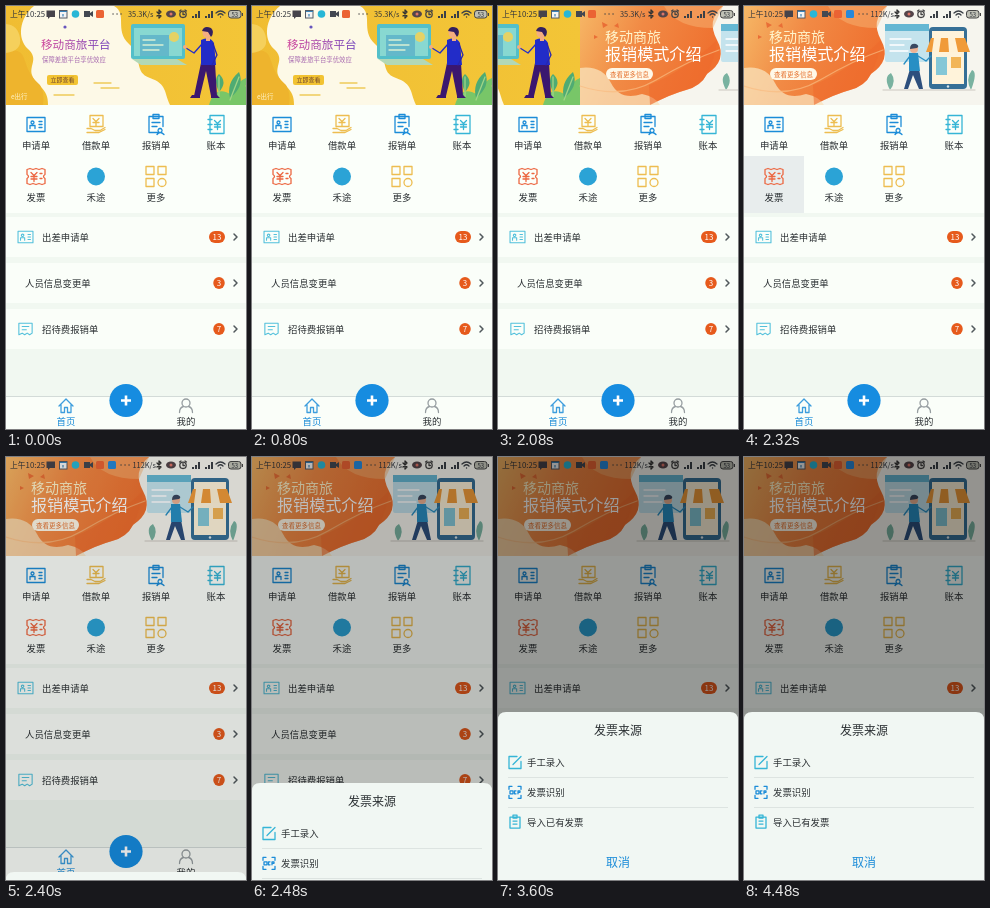
These frames come from a looping animation (240 px wide and 423 px high, 4.72 s). An HTML page:

```html
<!DOCTYPE html>
<html lang="zh-CN">
<head>
<meta charset="utf-8">
<style>
html, body { margin: 0; width: 100%; height: 100%; overflow: hidden; background: #fbfffa; }
svg { display: block; width: 100vw; height: 100vh; }
text { font-family: "Noto Sans CJK SC", "Noto Sans CJK", "Noto Sans", sans-serif; font-size: 9.4px; font-weight: 500; fill: #2b3033; }
.mid { text-anchor: middle; }
.line { fill: none; stroke-width: 1.3; stroke-linecap: round; stroke-linejoin: round; }
.blue { stroke: #1b8cd8; }
.gold { stroke: #edbd50; }
.cyan { stroke: #35b5d6; }
.red { stroke: #ec6741; }
.status text { font-size: 7.8px; fill: #30343b; }
</style>
</head>
<body>
<svg viewBox="0 0 240 423">
  <defs>
    <linearGradient id="gold" x2="1"><stop stop-color="#f0bd32"/><stop offset="1" stop-color="#f3c537"/></linearGradient>
    <linearGradient id="ink" x2="1"><stop stop-color="#d0459c"/><stop offset="1" stop-color="#7447bd"/></linearGradient>
    <linearGradient id="orange" x2="1" y2=".3"><stop stop-color="#f6b866"/><stop offset=".45" stop-color="#f18a45"/><stop offset="1" stop-color="#ef702f"/></linearGradient>
    <clipPath id="frame"><rect width="240" height="99"/></clipPath>
  </defs>
  <rect width="240" height="423" fill="#fbfffa"/>

  <g clip-path="url(#frame)">
    <g id="bannerA">
      <rect width="240" height="99" fill="url(#gold)"/>
      <path d="M28 0H108C122 8 108 24 123 38S127 66 144 72 158 86 164 99H42C43 82 29 79 26 69S33 53 22 43 13 12 28 0Z" fill="#fdf9e7"/>
      <path d="M0 46Q15 40 19 55T34 79Q39 87 37 99H0Z" fill="#eeb42d"/>
      <path d="M0 18Q12 19 14 32T0 47Z" fill="#f6d466" opacity=".8"/>
      <circle cx="59" cy="21" r="1.600" fill="#6755bd"/>
      <path class="line" d="M88 77h17M95 82h18M48 89h20" stroke="#efcb5a"/>
      <text x="35" y="43" font-weight="700" style="font-size:11.6px;fill:url(#ink)">移动商旅平台</text>
      <text x="36" y="56" style="font-size:6.400px;fill:#a86bb0">保障差旅平台享优效应</text>
      <rect x="41" y="69" width="31" height="10" rx="2" fill="#f2c332"/>
      <text class="mid" x="56.500" y="76.300" style="font-size:6px;fill:#70452f">立即查看</text>
      <text x="5" y="93" style="font-size:6.500px;fill:#fff5ce">e出行</text>
      <rect x="125" y="18" width="54" height="35" rx="2" fill="#53bfc9"/>
      <rect x="128" y="22" width="48" height="28" fill="#88d8d1"/>
      <rect x="134" y="29" width="29" height="21" fill="#64b8ca"/>
      <path class="line" d="M137 34h12M137 39h20M137 44h16" stroke="#d8f0d4"/>
      <circle cx="168" cy="31" r="5" fill="#e5d265"/>
      <path d="M126 53h45l10 6h-46Z" fill="#b2d8b6"/>
      <path d="M203 99Q209 78 226 89Q231 75 240 72V99Z" fill="#78c668"/>
      <path d="M213 86Q207 73 213 68Q222 76 213 86ZM224 92Q220 77 233 66Q239 80 224 92Z" fill="#4fab73"/>
      <path class="line" d="M213 71v20M233 71l-9 23" stroke="#a0d486" stroke-width="1"/>
      <path d="M195 57h14l2 33h-6l-5-25-6 25h-6Z" fill="#3b176f"/>
      <path d="M195 34q9-4 13 3l2 22h-15Z" fill="#222cc8"/>
      <path class="line" d="M196 38l-8 9-8-5" stroke="#222cc8" stroke-width="4"/>
      <path class="line" d="M207 38l4 11-5 10" stroke="#2926ad" stroke-width="4"/>
      <circle cx="179" cy="41" r="2" fill="#f4ad80"/>
      <rect x="200" y="29" width="4" height="6" fill="#f4ad80"/><circle cx="201" cy="27" r="4.500" fill="#f4ad80"/>
      <path d="M196 25q2-6 9-3 4 4 0 9l-3-5Z" fill="#33205f"/>
      <path d="M186 89h8v3h-10ZM205 89h6l3 3h-9Z" fill="#3b176f"/>
    </g>

    <g id="bannerB">
      <rect width="240" height="99" fill="#f6f5ee"/>
      <path d="M0 0H143Q126 14 137 34T127 68Q121 80 106 84T70 99H0Z" fill="url(#orange)"/>
      <path d="M0 62Q22 59 31 77T62 88Q76 91 80 99H0Z" fill="#fae3bc" opacity=".75"/>
      <path d="M69 79Q104 65 137 34Q135 53 127 68Q121 80 106 84T70 99Z" fill="#ef6a2d" opacity=".55"/>
      <path d="M84 0Q96 22 133 22L143 0Z" fill="#f8b474" opacity=".5"/>
      <path class="line" d="M0 80Q42 94 76 74T139 44" stroke="#f9bd82" opacity=".7"/>
      <path d="M22 16l6 3-5 3ZM34 20l4-3 1 5ZM14 29l4 2-4 2Z" fill="#e96e36"/>
      <text x="25" y="35.500" style="font-size:14px;fill:#fff4cb">移动商旅</text>
      <text x="25" y="53.500" style="font-size:16.100px;fill:#fff">报销模式介绍</text>
      <rect x="26" y="62" width="47" height="12" rx="6" fill="#fff8e8"/>
      <text class="mid" x="49.500" y="70.500" font-weight="700" style="font-size:6.500px;fill:#e56f2b">查看更多信息</text>
      <rect x="141" y="18" width="44" height="38" rx="2" fill="#c4e3ed"/>
      <path d="M141 18h44v7h-44Z" fill="#65b7d3"/>
      <path class="line" d="M146 33h21M146 39h14M146 45h18" stroke="#fff"/>
      <rect x="185" y="21" width="38" height="62" rx="4" fill="#366f96"/>
      <rect x="188" y="25" width="32" height="53" fill="#fff3da"/>
      <path d="M187 32h34l5 14h-44Z" fill="#f09b39"/>
      <path d="M190 32h7l-2 14h-7ZM204 32h7l3 14h-9Z" fill="#fff2d6"/>
      <rect x="192" y="51" width="11" height="18" fill="#84c7d7"/><rect x="207" y="51" width="10" height="11" fill="#f2b557"/>
      <circle cx="204" cy="80.500" r="1.200" fill="#dbe8ec"/>
      <path d="M166 63h9l4 20h-4l-6-14-5 14h-4Z" fill="#2d4f7d"/>
      <path d="M165 47h9l2 18h-11Z" fill="#288fc4"/>
      <path class="line" d="M166 50l-6 8M174 50l8 5 5-5" stroke="#288fc4" stroke-width="3"/>
      <circle cx="170" cy="43" r="4" fill="#eeb293"/><path d="M166 43q0-6 6-5 4 2 1 4Z" fill="#394861"/>
      <path d="M146 84q-7-13 1-17 6 8-1 17ZM227 84q7-18 1-20-7 9-1 20Z" fill="#79b2a0"/>
      <path class="line" d="M139 84h92" stroke="#dad8cf"/>
    </g>
  </g>

  <g class="status">
    <text x="4" y="11">上午10:25</text>
    <path d="M40.500 4.500h8.500v6.500h-5l-2 2v-2h-1.500Z" fill="#46434a"/>
    <rect x="53.500" y="4.500" width="7.500" height="7.500" fill="#f4f4f4" stroke="#555b65"/><path d="M54 5.500h7M57 8v2.500" stroke="#3983b8" stroke-width="1.200"/>
    <circle cx="69.500" cy="8" r="3.800" fill="#28b7d6"/>
    <path d="M78 5h6v2l3-2v6l-3-2v2h-6Z" fill="#434851"/>
    <rect x="90" y="4" width="8" height="8" rx="1.500" fill="#eb6333"/>
    <rect id="extra" x="102" y="4" width="8" height="8" rx="1.500" fill="#2688d9"/>
    <path id="dots" class="line" d="M0 8h.1M4 8h.1M8 8h.1" stroke="#444"/>
    <text id="speed" y="11" style="font-size:7.400px"></text>
    <path class="line" d="M151 6l4 4-2 2V4l2 2-4 4" stroke="#333" stroke-width="1"/>
    <ellipse cx="165" cy="8" rx="5" ry="3.500" fill="#54454a"/><circle cx="165" cy="8" r="1.500" fill="#df7468"/>
    <g class="line" stroke="#444" stroke-width="1"><circle cx="177" cy="8.300" r="3.200"/><path d="M177 6.500v2h1.500M173.500 5l1.500-1M180.500 5l-1.500-1"/></g>
    <path d="M186 12v-2h2v2ZM189 12V8h2v4ZM192 12V5h2v7ZM199 12v-2h2v2ZM202 12V8h2v4ZM205 12V5h2v7Z" fill="#3b4047"/>
    <path class="line" d="M210 7q4.500-4 9 0M212 9q2.500-2.500 5 0M214.500 11h.1" stroke="#3b4047"/>
    <rect x="222.500" y="4.500" width="12.500" height="7.500" rx="2.500" fill="#bfc0b5" stroke="#444"/>
    <text class="mid" x="228.800" y="10.800" style="font-size:6px">53</text><path d="M236.500 7v3" stroke="#444"/>
  </g>

  <rect id="press" y="150" width="60" height="59" fill="#e8eded"/>
  <g id="tiles"></g>

  <path d="M0 207H240V390H0Z" fill="#f1f8f1"/>
  <g id="rows"></g>

  <path d="M0 390H240V423H0Z" fill="#fafef9"/><path d="M0 390.500H240" stroke="#d3dbd8"/>
  <path class="line blue" stroke-opacity=".85" d="M53 400l7-7 7 7M55 399v7.500h3.500v-5h3v5H65V399"/>
  <g class="line" stroke="#969da0"><circle cx="180" cy="397" r="4"/><path d="M173.500 406.500q0-5 4-6M186.500 406.500q0-5-4-6"/></g>
  <text class="mid" x="60" y="418.500" style="fill:#1b8cd8">首页</text>
  <text class="mid" x="180" y="418.500">我的</text>
  <circle cx="120" cy="394.500" r="16.600" fill="#168ce0"/>
  <path d="M115 394.500h10M120 389.500v10" stroke="#fff" stroke-width="2.600"/>

  <rect id="dim" width="240" height="423" fill="#000"/>
  <g id="sheet">
    <path d="M0 170V8Q0 0 8 0H232Q240 0 240 8V170Z" fill="#f1f7f3"/>
    <text class="mid" x="120" y="23" style="font-size:12px">发票来源</text>
    <g id="choices"></g>
    <path d="M10 65.500H230M10 95.500H230" stroke="#dce3df" stroke-width=".9"/>
    <text class="mid" x="120" y="155" style="font-size:12px;fill:#1b8cd8">取消</text>
  </g>
</svg>
<script>
const $ = id => document.getElementById(id);
const path = (color, d) => `<path class="line ${color}" d="${d}"/>`;
const label = (x, y, s, mid) => `<text x="${x}" y="${y}"${mid ? ' class="mid"' : ''}>${s}</text>`;
const card = "M-9-7H9V7H-9ZM-6 4V1H-1V4M-5-2a1.500 1.500 0 1 0 3 0a1.500 1.500 0 1 0-3 0M3-3H6M3 0H6M3 3H6";
const yen = "M-3-4L0-1L3-4M0-1V5M-3 0H3M-3 2.500H3";

// Icons are centred on their own zero point.
const tiles = [
  ["申请单", path("blue", card)],
  ["借款单", path("gold", "M-6-9H7V2H-6ZM-3-6L0-3L3-6M0-3V1M-3-2H3M-9 4H-5L-1 6H4L9 3M-9 8H3L9 5")],
  ["报销单", path("blue", "M5 8H-7V-8H7V2M-3-10H3V-6H-3ZM-4-2H4M-4 2H1M4 4a2 2 0 1 0 .1 0M1 10Q4 6 8 10")],
  ["账本", path("cyan", "M-6-9H8V9H-6ZM-8-5H-4M-8 0H-4M-8 5H-4") + `<g transform="translate(1.500 0)">${path("cyan", yen)}</g>`],
  ["发票", path("red", "M-9-7L-6-8L-3-7L0-8L3-7L6-8L9-7V-2Q6 0 9 2V7L6 8L3 7L0 8L-3 7L-6 8L-9 7V2Q-6 0-9-2ZM4-3H6M4 2H6") + `<g transform="translate(-2 0)">${path("red", yen)}</g>`],
  ["禾途", `<circle r="9" fill="#2ba3d6"/>`],
  ["更多", path("gold", "M-10-10H-2V-2H-10ZM2-10H10V-2H2ZM-10 2H-2V10H-10ZM10 6a4 4 0 1 1-8 0a4 4 0 1 1 8 0")]
];
$("tiles").innerHTML = tiles.map(([name, icon], i) => {
  const x = 30 + i % 4 * 60, y = 118.5 + (i > 3) * 52;
  return `<g transform="translate(${x} ${y})">${icon}</g>` + label(x, y + 24, name, true);
}).join("");

const ticket = "M-8-7H8V5L5 7L2 5L-1 7L-4 5L-8 7ZM-4-3H4M-4 1H1";
const rows = [
  [211, 40, "出差申请单", 13, path("cyan", card)],
  [257, 40, "人员信息变更单", 3, ""],
  [303, 40, "招待费报销单", 7, path("cyan", ticket)]
];
$("rows").innerHTML = rows.map(([y, h, name, count, icon]) => {
  const c = y + 20, w = count > 9 ? 16 : 11.5, x = count > 9 ? 211 : 213;
  return `<rect y="${y}" width="240" height="${h}" fill="#fafef9"/>
    <g transform="translate(19.500 ${c}) scale(.83)" opacity=".85">${icon}</g>${label(icon ? 36 : 19, c + 3.5, name)}
    <rect x="${x - w / 2}" y="${c - 6}" width="${w}" height="12" rx="6" fill="#e65a1c"/>
    <text class="mid" x="${x}" y="${c + 2.8}" style="font-size:8px;fill:#fff">${count}</text>
    <path class="line" d="M228 ${c - 3}l3 3-3 3" stroke="#51595d" style="stroke-width:1.500"/>`;
}).join("");

const choices = [
  ["手工录入", path("cyan", "M2-6H-6V6H6V-1M-2 2L6-6")],
  ["发票识别", path("blue", "M-6-3V-6H-3M3-6H6V-3M6 3V6H3M-3 6H-6V3M-5-1.500H-2V1.500H-5ZM1-1.500H-.5V1.500H1M3 1.500V-1.500H5V0H3")],
  ["导入已有发票", path("cyan", "M-5-5H5V6H-5ZM-2-7H2V-4H-2ZM-2-1H2M-2 2H2")]
];
$("choices").innerHTML = choices.map(([name, icon], i) => {
  const y = 50.5 + i * 29.8;
  return `<g transform="translate(17 ${y})">${icon}</g>` + label(29, y + 3.5, name);
}).join("");

// Each step: time, banner shift, sheet top, shade.
const steps = [
  [0, 0, 423, 0], [2000, 66, 423, 0], [2080, 158, 423, 0], [2160, 220, 423, 0],
  [2240, 240, 423, 0], [2400, 240, 415, .12], [2480, 240, 326, .26],
  [2560, 240, 269, .36], [2640, 240, 255, .4]
];
const move = (id, x, y) => $(id).setAttribute("transform", `translate(${x} ${y})`);

function draw(now) {
  const t = now % 4720;
  const [, shift, top, shade] = steps.findLast(s => s[0] <= t);
  const late = t >= 2240;
  move("bannerA", -shift, 0);
  move("bannerB", 240 - shift, 0);
  move("sheet", 0, top);
  move("dots", late ? 115 : 107, 0);
  $("dim").setAttribute("opacity", shade);
  $("press").setAttribute("opacity", t >= 2320 && t < 2400 ? 1 : 0);
  $("extra").setAttribute("opacity", late ? 1 : 0);
  $("speed").setAttribute("x", late ? 126.5 : 122);
  $("speed").textContent = late ? "112K/s" : "35.3K/s";
}

let start;
function tick(now) {
  start ??= now;
  draw(now - start);
  requestAnimationFrame(tick);
}
draw(0);
requestAnimationFrame(tick);
</script>
</body>
</html>
```
